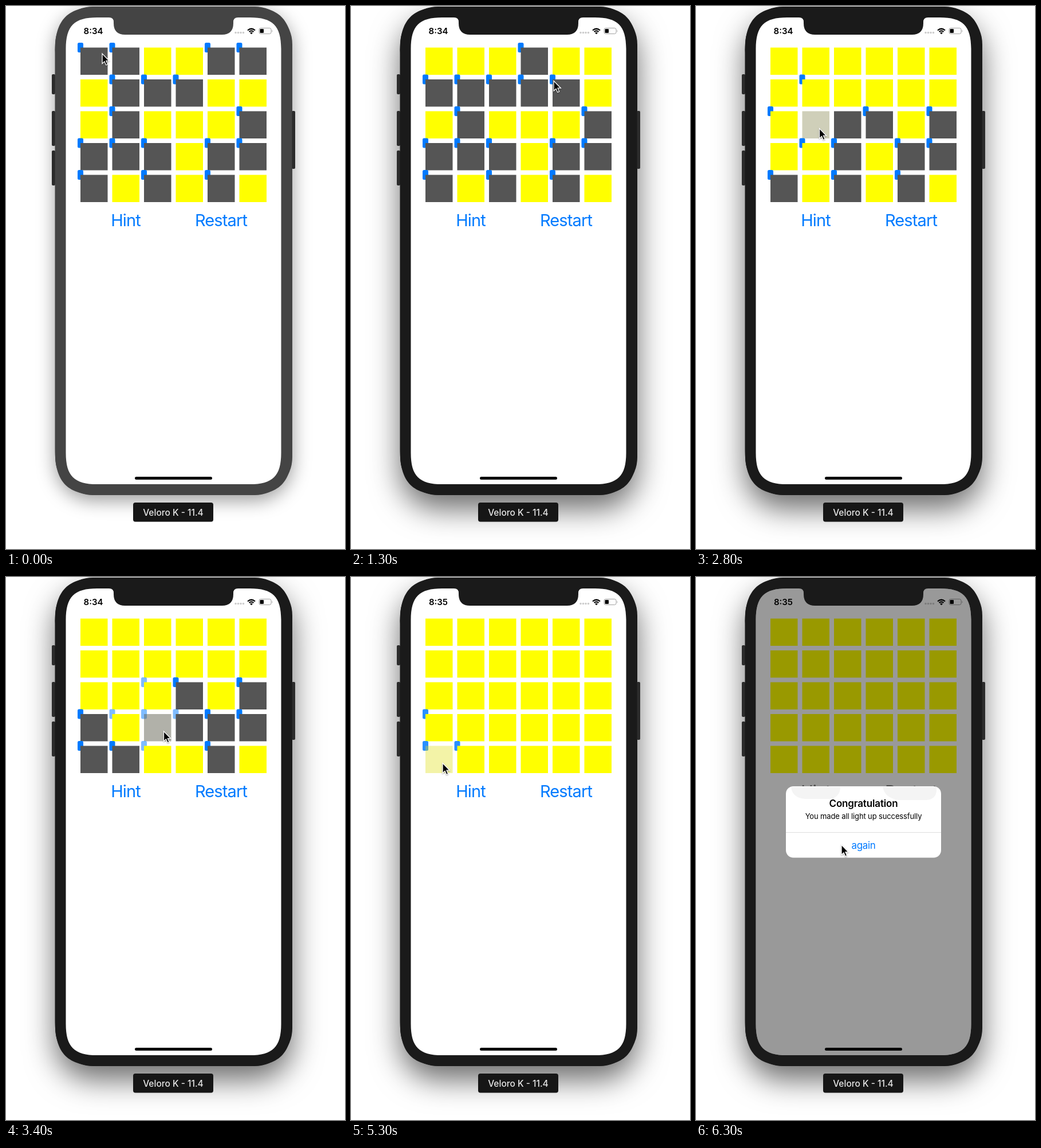
Write an HTML page that moves like this. It is 592 px wide and 947 px high and loops after 6.4 s.

```html
<!DOCTYPE html>
<html lang="en">
<head>
<meta charset="utf-8">
<style>
  html, body { margin: 0; width: 100%; height: 100%; overflow: hidden; background: #fff; }
  .idle { --case: #444; --shadow: 0 9px 32px rgba(0, 0, 0, .4); }
  .active { --case: #1a1a1a; --shadow: 0 24px 52px rgba(0, 0, 0, .58); }
  #shell {
    position: absolute; left: 85.5px; top: 1px; width: 414px; height: 852px;
    border-radius: 66px; background: var(--case); box-shadow: var(--shadow);
  }
  .case { fill: var(--case); }
  svg { position: absolute; left: 0; top: 0; }
  text { font-family: Inter, Roboto, sans-serif; text-anchor: middle; }
  .button { font-size: 29px; letter-spacing: -.03em; }
  #cursor { filter: drop-shadow(0 1px 1px rgba(0, 0, 0, .35)); }
</style>
</head>
<body class="idle">
<div id="shell"></div>
<svg width="592" height="947" viewBox="0 0 592 947">
  <g fill="#2b2b2b">
    <rect x="80" y="119" width="6" height="35" rx="2"/>
    <rect x="80" y="183" width="6" height="61" rx="2"/>
    <rect x="80" y="252" width="6" height="61" rx="2"/>
    <rect x="499" y="183" width="6" height="101" rx="2"/>
  </g>
  <path id="bezel" class="case"/>
  <path id="screen" fill="#fff"/>

  <text id="clock" x="152.5" y="48.5" font-size="15" font-weight="600"></text>
  <path d="M401 46.500h14" stroke="#ccc" stroke-width="3.600" stroke-linecap="round" stroke-dasharray="0 4.500"/>
  <path d="M422 42.500q6.500-5.500 13 0M424.500 45q4-3.300 8 0" fill="none" stroke="#000" stroke-width="2.200"/>
  <path d="M426 46.700q2.500-1.800 5 0l-2.500 2.500z"/>
  <rect x="442" y="38.500" width="21" height="10" rx="2.700" fill="none" stroke="#a0a0a0"/>
  <rect x="443.500" y="40" width="6.500" height="7" rx="1"/>
  <path d="M464.500 41.500q1.800 2 0 4z" fill="#a0a0a0"/>

  <g id="board"></g>
  <g id="buttons">
    <text class="button" x="209" y="384">Hint</text>
    <text class="button" x="375.500" y="384">Restart</text>
  </g>
  <rect x="225" y="821" width="135" height="5" rx="2.500"/>
  <path id="dim"/>
  <path class="case" d="M180 19v1q8 0 8 8v2q0 20 20 20H377q20 0 20-20v-2q0-8 8-8v-1z"/>

  <g id="alert">
    <rect x="157" y="365" width="271" height="124.500" rx="13" fill="#fff"/>
    <path d="M166 366h86q0 18-18 21h-42q-24-1-26-21zM326 366h94q2 22-18 23h-48q-24-3-28-23z" fill="#f4f4f4"/>
    <path d="M157 445.500h271" stroke="#ddd"/>
    <text x="292.500" y="401" font-size="17" font-weight="600" letter-spacing="-.15">Congratulation</text>
    <text x="292.500" y="421.500" font-size="13" letter-spacing="-.13">You made all light up successfully</text>
    <text x="292.500" y="474" font-size="17" letter-spacing="-.3" fill="#007aff">again</text>
  </g>

  <rect x="222" y="866" width="140" height="33.500" rx="4" fill="#161616"/>
  <text x="292" y="889" font-size="15.500" font-weight="500" fill="#e8e8e8">Veloro K - 11.4</text>
  <path id="cursor" d="M0 0V17.500L4 13.800L6.700 20L9.600 18.800L7 12.700H12.300Z" stroke="#fff" stroke-width="1.300"/>
</svg>
<script>
const LOOP = 6400, STEP = 100, FADE = 260;
const SIZE = 47.5, PITCH = 55.5, LEFT = 130, TOP = 72.5;
const START = ['001100', '100011', '101110', '000100', '010101'];
const CLICK_TIMES = [580, 960, 1700, 2480, 2800, 3040, 3270, 3620, 4280, 4720, 5258];

const $ = id => document.getElementById(id);
const clamp = v => Math.max(0, Math.min(1, v));
const ease = p => p * p * (3 - 2 * p);
const paint = on => on ? '#ff0' : '#555';
const near = (a, b) => Math.abs(a.row - b.row) + Math.abs(a.col - b.col);

// Rounded rectangle with continuous corners.
function squircle(x, y, w, h, r) {
  const k = 1.3 * r, m = .952 * r;
  return `M${x} ${y + k}c0 ${-m} ${k - m} ${-k} ${k} ${-k}h${w - 2 * k}c${m} 0 ${k} ${k - m} ${k} ${k}` +
    `v${h - 2 * k}c0 ${m} ${m - k} ${k} ${-k} ${k}h${2 * k - w}c${-m} 0 ${-k} ${m - k} ${-k} ${-k}z`;
}

function rect(x, y, width, height, rx, fill) {
  const el = document.createElementNS('http://www.w3.org/2000/svg', 'rect');
  Object.entries({ x, y, width, height, rx, fill }).forEach(([k, v]) => el.setAttribute(k, v));
  return $('board').appendChild(el);
}

const cells = START.flatMap((line, row) => [...line].map((lit, col) => {
  const x = LEFT + col * PITCH, y = TOP + row * PITCH;
  return {
    row, col, start: +lit,
    tab: rect(x - 5, y - 8.5, 10, 17, 2.5, '#007aff'),
    ghost: rect(x, y, SIZE, SIZE, 0),
    face: rect(x, y, SIZE, SIZE, 0)
  };
}));

// Each row is solved by pressing below every dark cell, starting from the nearer side.
function solve() {
  const presses = [];
  const press = (row, col) => presses.push({ row, col, time: CLICK_TIMES[presses.length] });
  const isLit = cell => (cell.start + presses.filter(p => near(p, cell) < 2).length) % 2;
  press(0, 0);
  press(0, 4);
  for (let row = 1; row < START.length; row++) {
    const dark = cells.filter(c => c.row === row - 1 && !isLit(c));
    if (presses.at(-1).col > 3) dark.reverse();
    dark.forEach(c => press(row, c.col));
  }
  return presses;
}

const presses = solve();
const stops = [
  { time: 0, x: 168, y: 83 },
  ...presses.map(({ time, row, col }) => ({ time, x: LEFT + 30 + col * PITCH, y: TOP + 30 + row * PITCH })),
  { time: LOOP, x: 254, y: 467 }
];

function drawCell(cell, t) {
  const hits = presses.filter(p => p.time <= t && near(p, cell) < 2);
  const on = (cell.start + hits.length) % 2;
  const fade = hits.length ? clamp((t - hits.at(-1).time) / FADE) : 1;
  const touch = presses.find(p => near(p, cell) === 0);
  const p = touch && t >= touch.time - STEP ? clamp((t - touch.time) / FADE) : 1;
  cell.tab.style.opacity = on ? 1 - fade : fade;
  cell.ghost.style.fill = paint(!on);
  cell.ghost.style.opacity = .12 * (1 - p);
  cell.face.style.fill = paint(on);
  cell.face.style.opacity = .28 + .72 * p * p;
}

// The pointer rests briefly after a click and arrives a little before the next.
function cursorAt(t) {
  const i = stops.findIndex(s => s.time > t), from = stops[i - 1], to = stops[i];
  const leave = from.time + 100, arrive = to.time - .22 * (to.time - from.time);
  const e = ease(clamp((t - leave) / (arrive - leave)));
  return [from.x + (to.x - from.x) * e, from.y + (to.y - from.y) * e];
}

function draw(t) {
  const shown = clamp((t - 5400) / 200), scale = 1.2 - .2 * shown;
  document.body.className = t < 300 ? 'idle' : 'active';
  $('clock').textContent = t < 4600 ? '8:34' : '8:35';
  cells.forEach(cell => drawCell(cell, t));
  $('buttons').style.fill = shown ? '#808080' : '#007aff';
  $('dim').style.opacity = .4 * shown;
  $('alert').style.opacity = shown;
  $('alert').setAttribute('transform', `translate(292.5 427) scale(${scale}) translate(-292.5 -427)`);
  $('cursor').setAttribute('transform', `translate(${cursorAt(t)})`);
}

function tick() {
  draw(Math.floor(performance.now() % LOOP / STEP) * STEP);
  requestAnimationFrame(tick);
}

$('bezel').setAttribute('d', squircle(85.5, 1, 414, 852, 62));
for (const id of ['screen', 'dim']) $(id).setAttribute('d', squircle(104.5, 20, 376, 814, 42));
tick();
</script>
</body>
</html>
```
